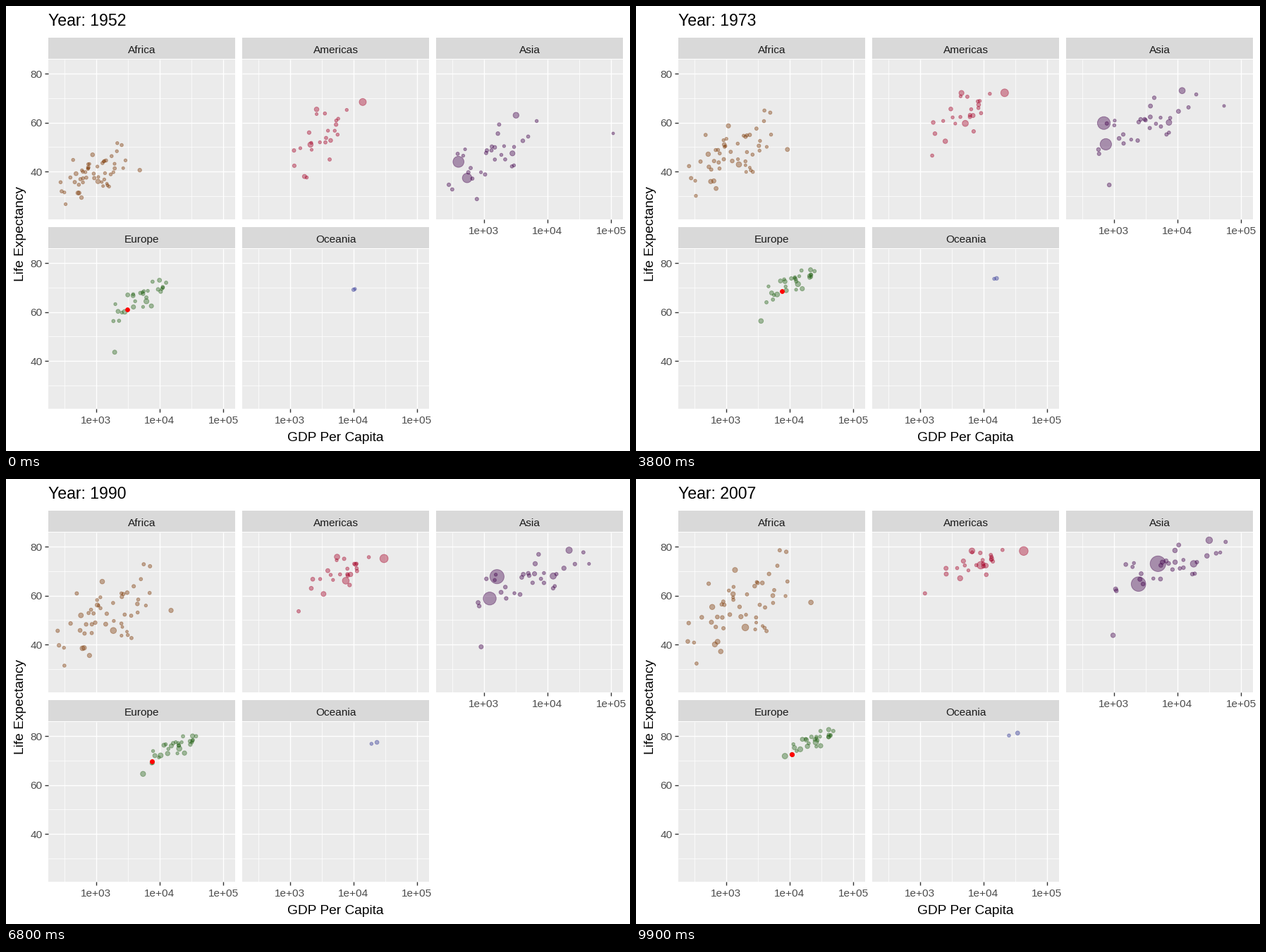
Animation, 885 px wide and 632 px high, one loop 10000 ms. Source, as a matplotlib script:

```python
import numpy as np
import matplotlib.pyplot as plt
from matplotlib.animation import FuncAnimation
from matplotlib.colors import to_rgba
from matplotlib.patches import Rectangle

W, H, DPI = 885, 632, 100
PX = 72 / DPI
FRAMES, INTERVAL = 100, 100
FIRST, LAST = 1952, 2007
STEPS = 11
T = np.linspace(0, 1, STEPS + 1)  # one node per five years
BASE = 19.2

plt.rcParams["font.family"] = "Liberation Sans"
rng = np.random.default_rng(12)

# Panels: name, column, row, colour
PANELS = [
    ("Africa", 0, 0, "#7F3B08"),
    ("Americas", 1, 0, "#A50026"),
    ("Asia", 2, 0, "#40004B"),
    ("Europe", 0, 1, "#276419"),
    ("Oceania", 1, 1, "#313695"),
]

# Standout dots: population in millions at both ends, then
# (income, life expectancy) waypoints evenly spaced over the loop
LEADERS = {
    "Africa": [(33, 135, (1077, 36), (1800, 45), (2014, 47))],
    "Americas": [
        (158, 301, (13990, 68.4), (42952, 78.2)),
        (57, 190, (2109, 51), (6800, 62.3), (9066, 72.4)),
        (3, 8, (1840, 37.6), (1202, 60.9)),
    ],
    "Asia": [
        (556, 1319, (400, 44), (826, 64.6), (4959, 73)),
        (372, 1110, (547, 37.4), (826, 55.3), (2452, 64.7)),
        (86, 127, (3217, 63), (17650, 76.1), (31656, 82.6)),
        (0.2, 2.5, (108382, 55.6), (44000, 70.2), (47307, 77.6)),
        (8, 32, (779, 28.8), (975, 43.8)),
    ],
    "Europe": [(22, 71, (1969, 43.6), (4250, 60.2), (8458, 71.8))],
    "Oceania": [
        (9, 20, (10040, 69.1), (34435, 81.2)),
        (2, 4, (10557, 69.4), (25185, 80.2)),
    ],
}
HIGHLIGHT = [(16.6, 22.3, (3145, 61), (5800, 67), (9500, 69.6),
              (7100, 69.5), (10808, 72.5))]

# Other dots: count, median population, growth, skew, correlation, then
# (mean log income, mean life, income spread, life spread) at both ends
CLOUDS = {
    "Africa": (51, 3.0, 3.0, 0.40, 0.50,
               (2.98, 39.3, 0.28, 5.0), (3.25, 55.5, 0.45, 9.5)),
    "Americas": (22, 4.0, 2.4, 0.10, 0.60,
                 (3.50, 54.5, 0.23, 7.5), (3.89, 73.5, 0.24, 3.2)),
    "Asia": (28, 7.0, 2.6, 0.25, 0.75,
             (3.12, 46.5, 0.36, 8.0), (3.85, 71.8, 0.45, 5.8)),
    "Europe": (28, 8.0, 1.25, -0.35, 0.80,
               (3.72, 65.8, 0.25, 4.3), (4.38, 78.0, 0.20, 2.6)),
}


def radius(pop):
    return 1.8 + 9.3 * np.sqrt(np.asarray(pop) / 1319)


def leader_paths(rows):
    xs, ys = [], []
    for _, _, *points in rows:
        income, life = np.array(points, float).T
        when = np.linspace(0, 1, len(points))
        xs.append(np.interp(T, when, np.log10(income)))
        ys.append(np.interp(T, when, life))
    return (np.array(xs), np.array(ys),
            radius([r[0] for r in rows]), radius([r[1] for r in rows]))


def standardise(a):
    return (a - a.mean(0)) / a.std(0)


def cloud_paths(count, median, growth, skew, rho, start, end):
    pace = T * (1.5 - 0.5 * T)
    mx, my, sx, sy = (a + (b - a) * pace for a, b in zip(start, end))
    z = np.clip(rng.standard_normal((count, 2)), -1.9, 1.9)
    u = standardise(np.expm1(skew * z[:, :1]) / skew)
    v = standardise(z[:, 1:])
    x = mx + sx * u + rng.normal(0, 0.015, (count, T.size))
    y = my + sy * (rho * u + np.sqrt(1 - rho**2) * v)
    y += rng.normal(0, 0.3, (count, T.size))
    pop = np.minimum(median * np.exp(rng.normal(0, 1, count)), 50)
    return x, y, radius(pop), radius(pop * growth)


def left(col):
    return 60 + 275 * col


def top(row):
    return 76 + 269 * row


def sx_of(log_income, col):
    return left(col) + 67.6 + 90.2 * (log_income - 3)


def sy_of(life, row):
    return top(row) + 20 + 3.48 * (80 - life)


fig = plt.figure(figsize=(W / 100, H / 100), dpi=DPI, facecolor="white")
ax = fig.add_axes([0, 0, 1, 1])
ax.set_xlim(0, W)
ax.set_ylim(H, 0)
ax.axis("off")


def box(x, y, w, h, color):
    ax.add_patch(Rectangle((x, y), w, h, fc=color, lw=0, zorder=1))


def line(x, y, color, width):
    ax.plot(x, y, color=color, lw=width * PX, zorder=2,
            solid_capstyle="butt")


def label(x, y, text, scale, color="black", ha="center", **kw):
    return ax.text(x, y, text, fontsize=BASE * scale * PX, color=color,
                   ha=ha, va="baseline", **kw)


def draw_panel(name, col, row):
    x0, y0 = left(col), top(row)
    x1, y1 = x0 + 265, y0 + 227
    box(x0, y0 - 31, 265, 30, "#D9D9D9")
    box(x0, y0, 265, 227, "#EBEBEB")
    label(x0 + 132.5, y0 - 9, name, 0.8, "#1A1A1A")
    for width, logs, lives in ((0.7, (2.5, 3.5, 4.5), (30, 50, 70)),
                               (1.4, (3, 4, 5), (40, 60, 80))):
        for g in logs:
            line([sx_of(g, col)] * 2, [y0, y1], "white", width)
        for v in lives:
            line([x0, x1], [sy_of(v, row)] * 2, "white", width)
    if col == 0:
        for v in (40, 60, 80):
            y = sy_of(v, row)
            line([x0 - 5, x0], [y, y], "#333333", 1.4)
            label(x0 - 8.5, y + 5.7, str(v), 0.8, "#4D4D4D", "right")
    if row == 1 or col == 2:
        for g in (3, 4, 5):
            x = sx_of(g, col)
            line([x, x], [y1, y1 + 5], "#333333", 1.4)
            label(x, y1 + 21, f"1e+0{g}", 0.8, "#4D4D4D")


def add_dots(paths, col, row, color, alpha, z):
    x, y, r0, r1 = paths
    rgba = to_rgba(color, alpha)
    dots = ax.scatter(x[:, 0], y[:, 0], facecolor=rgba, edgecolor=rgba,
                      linewidths=0.95 * PX, zorder=z)
    return dots, sx_of(x, col), sy_of(y, row), r0, r1


groups = []
for name, col, row, color in PANELS:
    draw_panel(name, col, row)
    sets = [leader_paths(LEADERS[name])]
    if name in CLOUDS:
        sets.append(cloud_paths(*CLOUDS[name]))
    merged = [np.concatenate(part) for part in zip(*sets)]
    groups.append(add_dots(merged, col, row, color, 0.4, 3))
groups.append(add_dots(leader_paths(HIGHLIGHT), 0, 1, "red", 1, 4))

title = label(60, 28, "", 1.2, ha="left")
label(467.5, 618, "GDP Per Capita", 1)
label(25.5, 323.5, "Life Expectancy", 1, rotation=90,
      rotation_mode="anchor")


def update(i):
    t = i / (FRAMES - 1)
    k = min(int(t * STEPS), STEPS - 1)
    f = t * STEPS - k
    title.set_text(f"Year: {round(FIRST + t * (LAST - FIRST))}")
    for dots, x, y, r0, r1 in groups:
        pos = [p[:, k] + f * (p[:, k + 1] - p[:, k]) for p in (x, y)]
        dots.set_offsets(np.column_stack(pos))
        dots.set_sizes((2 * PX * (r0 + t * (r1 - r0))) ** 2)
    return [title] + [g[0] for g in groups]


anim = FuncAnimation(fig, update, frames=FRAMES, interval=INTERVAL,
                     repeat=True, repeat_delay=0)
plt.show()
```
